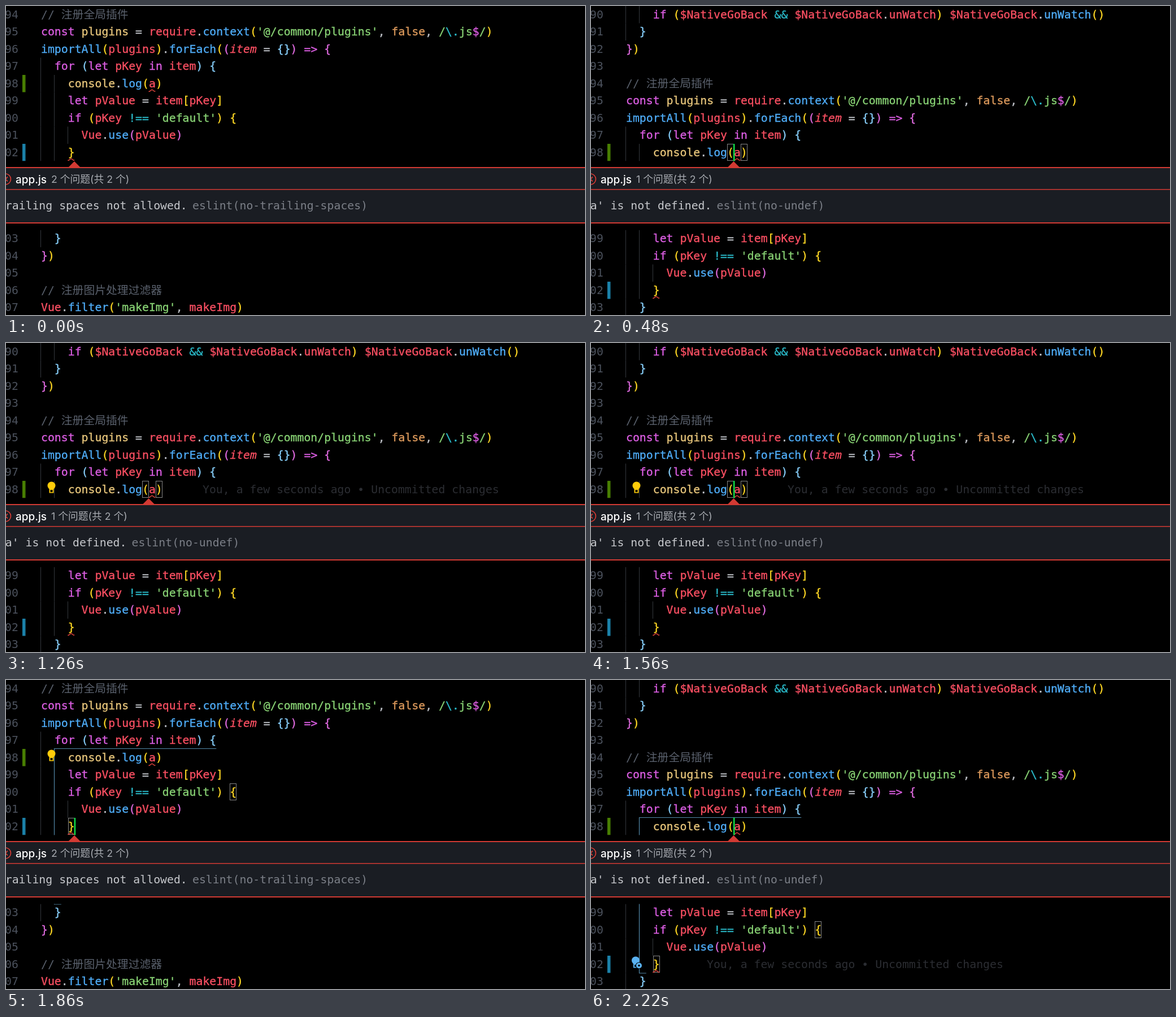
These frames come from a looping animation (1025x547 px, 2.28 s). An HTML page with a canvas:

```html
<!DOCTYPE html>
<html lang="zh-CN">
<meta charset="utf-8">
<title>Editor problem navigation</title>
<style>
html, body { margin: 0; width: 100%; height: 100%; overflow: hidden; background: #000 }
canvas { display: block }
</style>
<canvas id="stage" width="1025" height="547"></canvas>
<script>
const ctx = document.getElementById('stage').getContext('2d');
const LOOP = 2280, ROW = 30.5, CHAR = 11.935, LEFT = 62, BASE = 21.7;
const MONO = '19.825px "DejaVu Sans Mono", "Noto Sans CJK SC", "Noto Sans CJK", monospace';
const SANS = 'Inter, "Noto Sans CJK SC", "Noto Sans CJK", sans-serif';
const RED = '#d23a33';

const COLORS = {
  p: '#dc5ee3', r: '#f94f62', i: '#f94f62', y: '#e9c77c', b: '#4fadf8', n: '#88d274',
  c: '#2bbccb', a: '#dd9a5c', w: '#bfc2c8', m: '#5a616d',
  g: '#ffd824', o: '#e06be0', s: '#87cefa'
};

// "^x" switches to colour x; "i" is italic
const FIRST = 90;
const CODE = [
  '    ^pif ^g(^r$NativeGoBack ^c&& ^r$NativeGoBack^w.^runWatch^g) ^r$NativeGoBack^w.^bunWatch^g()',
  '  ^s}',
  '^o}^g)',
  '',
  '^m// 注册全局插件',
  "^pconst ^yplugins ^w= ^rrequire^w.^bcontext^g(^n'@/common/plugins'^w, ^afalse^w, ^n/^c\\.^njs^p$^n/^g)",
  '^bimportAll^g(^rplugins^g)^w.^bforEach^g(^o(^iitem ^w= ^s{}^o) ^p=> ^o{',
  '  ^pfor ^s(^plet ^rpKey ^pin ^ritem^s) {',
  '    ^yconsole^w.^blog^g(^ra^g)',
  '    ^plet ^rpValue ^w= ^ritem^g[^rpKey^g]',
  "    ^pif ^g(^rpKey ^c!== ^n'default'^g) {",
  '      ^rVue^w.^buse^o(^rpValue^o)',
  '    ^g}',
  '  ^s}',
  '^o}^g)',
  '',
  '^m// 注册图片处理过滤器',
  "^rVue^w.^bfilter^g(^n'makeImg'^w, ^rmakeImg^g)"
];

const VIEWS = {
  upper: { first: 90, tip: 252.5, index: 1, message: "'a' is not defined.", rule: 'eslint(no-undef)' },
  lower: { first: 94, tip: 121, index: 2, message: 'Trailing spaces not allowed.', rule: 'eslint(no-trailing-spaces)' }
};
const LOG = [[98, 15], [98, 17]], BLOCK = [[100, 28], [102, 4]];

function stateAt(t) {
  if (t < 360) return { view: VIEWS.lower };
  if (t < 1620) return {
    view: VIEWS.upper, caret: (t - 360) % 1020 < 500 && [98, 16],
    pair: t >= 420 && LOG, bulb: t >= 660 && 98, note: t >= 660 && 98
  };
  if (t < 2220) return {
    view: VIEWS.lower, caret: t < 2130 && [102, 5], scope: true,
    pair: t < 1680 ? LOG : BLOCK, bulb: t < 1920 ? 98 : 102, note: t >= 1920 && 102
  };
  return { view: VIEWS.upper, caret: [98, 16], scope: true, pair: BLOCK, bulb: 102, note: 102 };
}

function rect(color, x, y, w, h) {
  ctx.fillStyle = color;
  ctx.fillRect(x, y, w, h);
}

// weight thickens the letters a little
function text(str, x, y, color, font = MONO, weight = 0) {
  ctx.font = font;
  ctx.fillStyle = ctx.strokeStyle = color;
  ctx.fillText(str, x, y);
  if (!weight) return;
  ctx.lineWidth = weight;
  ctx.strokeText(str, x, y);
}

function disc(color, x, y, r) {
  ctx.fillStyle = color;
  ctx.beginPath();
  ctx.arc(x, y, r, 0, 7);
  ctx.fill();
}

function stroke(color, width, ...points) {
  ctx.strokeStyle = color;
  ctx.lineWidth = width;
  ctx.beginPath();
  points.forEach(([x, y]) => ctx.lineTo(x, y));
  ctx.stroke();
}

const colX = col => LEFT + col * CHAR;

// The problem panel takes the place of four rows after the ninth
function lineY(line, first) {
  const row = line - first;
  return (row > 8 ? row + 4 : row) * ROW;
}

function drawLine(line, y) {
  const src = CODE[line - FIRST];
  const depth = src.search(/\S|$/) / 2;
  for (let d = 0; d < depth; d++) rect('#34373d', Math.floor(colX(d * 2)) - (d ? 0 : 1), y, 1, ROW);
  text(String(line % 100).padStart(2, '0'), -2, y + BASE, '#4b515c');
  let col = 0;
  src.split('^').forEach((part, k) => {
    const str = k ? part.slice(1) : part;
    if (k) text(str, colX(col), y + BASE, COLORS[part[0]], (part[0] === 'i' ? 'italic ' : '') + MONO, part[0] === 'm' ? 0 : .35);
    col += str.length;
  });
}

function drawSquiggle(col, y) {
  const x = colX(col) - .5;
  stroke('#e0443c', 1.4, [x, y + 29.5], [x + 2, y + 29], [x + 5, y + 26.5],
    [x + 7, y + 26.5], [x + 10, y + 29], [x + 12, y + 29]);
}

function drawBulb(line, y) {
  const auto = line === 102, color = auto ? '#5ab2f2' : '#ffcc0a', x = auto ? 79 : 80.5;
  disc(color, x, y + 8.5, 7);
  rect(color, x - 4, y + 12, 8, 9.5);
  rect('#000', x - 2, y + 16, 4, 4);
  if (!auto) return;
  disc('#000', 85, y + 17.5, 6);
  disc(color, 85, y + 17.5, 5);
  disc('#000', 85, y + 17.5, 1.7);
}

function drawScope(first) {
  const color = '#5288a8', x = Math.floor(colX(2)) + .5;
  const top = lineY(98, first) - .5, end = lineY(103, first) + .5;
  stroke(color, 1.2, [colX(26), top], [x, top], [x, end], [colX(3), end]);
}

function drawPanel({ tip, index, message, rule }) {
  rect('#000', 0, 274.5, 1025, 122);
  rect('#1a1d23', 0, 286, 1025, 98);
  rect(RED, 0, 285, 1025, 2);
  rect(RED, 0, 324, 1025, 1.5);
  rect(RED, 0, 383, 1025, 2);
  ctx.fillStyle = RED;
  ctx.beginPath();
  ctx.moveTo(tip - 11, 286);
  ctx.lineTo(tip, 275);
  ctx.lineTo(tip + 11, 286);
  ctx.fill();

  ctx.strokeStyle = '#e03c34';
  ctx.lineWidth = 1.6;
  ctx.beginPath();
  ctx.arc(-1, 306.5, 9.5, 0, 7);
  ctx.stroke();
  stroke('#e03c34', 1.6, [-5, 302.5], [3, 310.5]);
  stroke('#e03c34', 1.6, [-5, 310.5], [3, 302.5]);
  text('app.js', 17, 314, '#fff', '500 19px ' + SANS);
  text(index + ' 个问题(共 2 个)', 80, 313, '#a9acb2', '17.75px ' + SANS);
  text(message, -13.2, 360, '#c6c8cc');
  text(rule, -4.2 + message.length * CHAR, 360, '#7b7f87');
}

function draw(now) {
  const { view, caret, scope, pair, bulb, note } = stateAt(now % LOOP);
  const yOf = line => lineY(line, view.first);
  rect('#000', 0, 0, 1025, 547);
  for (let n = 0; n < 14; n++) drawLine(view.first + n, yOf(view.first + n));

  rect('#487e02', 29, yOf(98), 5.5, ROW);
  rect('#1b81a8', 29, yOf(102), 5.5, ROW);
  if (scope) drawScope(view.first);
  for (const [line, col] of pair || []) {
    ctx.strokeStyle = '#858585';
    ctx.lineWidth = 1;
    ctx.strokeRect(Math.round(colX(col)) + .5, Math.round(yOf(line)) + .5, 11, 29);
  }
  drawSquiggle(16, yOf(98));
  drawSquiggle(4, yOf(102));
  if (note) text('You, a few seconds ago • Uncommitted changes', note === 98 ? 348 : 205, yOf(note) + BASE, '#2b2d32');
  if (bulb) drawBulb(bulb, yOf(bulb));
  drawPanel(view);
  if (caret) rect('#10e048', colX(caret[1]) - 1, yOf(caret[0]), 2.5, ROW);
}

const start = performance.now();
function tick() {
  draw(performance.now() - start);
  requestAnimationFrame(tick);
}
tick();
</script>
</html>
```
